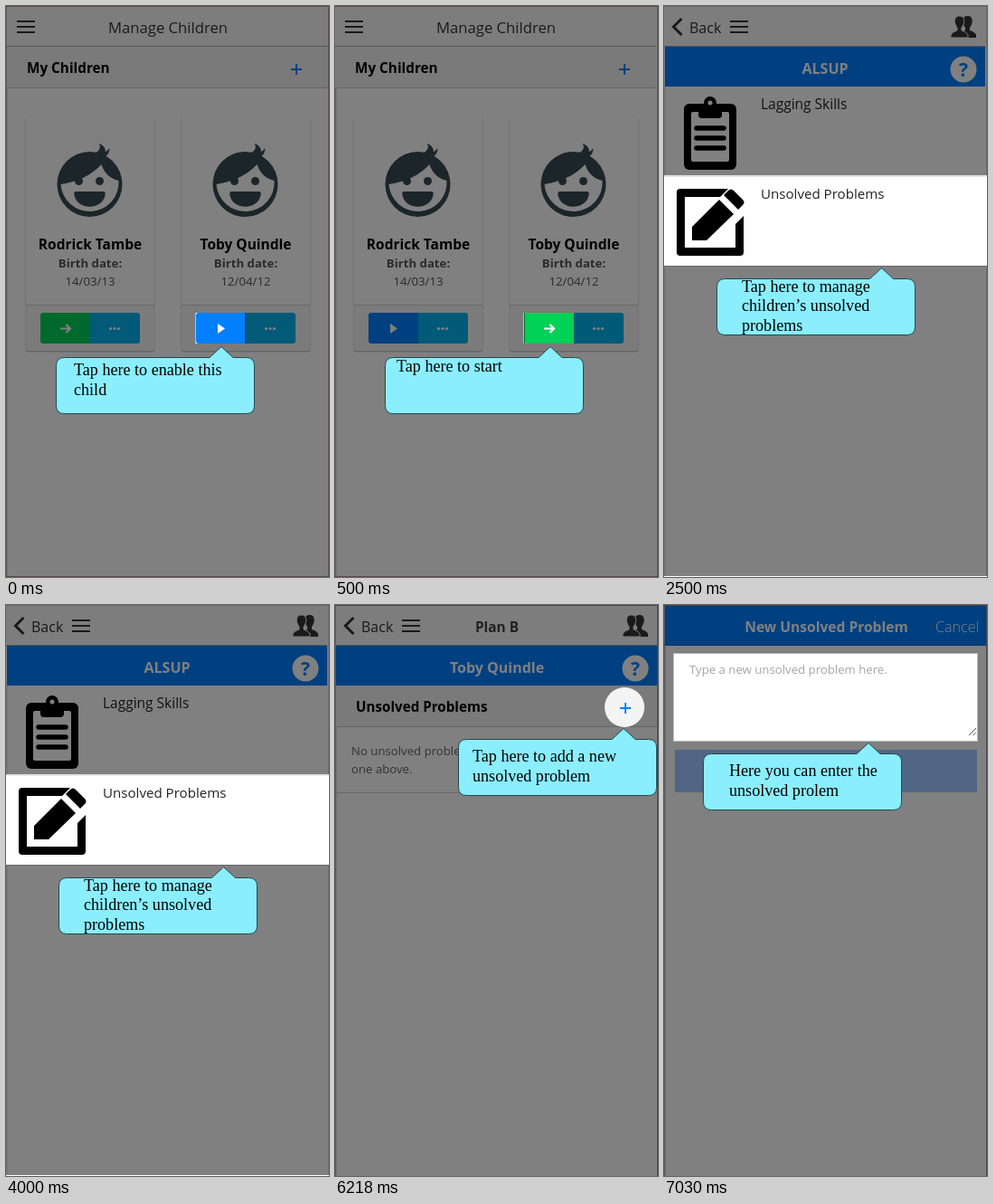
An HTML page that plays this animation: 357 by 631 pixels, repeating every 8000 ms.

```html
<!DOCTYPE html>
<html lang="en">
<head>
<meta charset="utf-8">
<title>App walkthrough</title>
<style>
  html, body { margin: 0; width: 100%; height: 100%; overflow: hidden; background: #808080; }
  svg { display: block; width: 357px; height: 631px; font-family: "Open Sans", "Noto Sans", sans-serif; }
  .note { font: 18.1px "Liberation Serif", "Times New Roman", serif; }
</style>
</head>
<body>
<svg id="stage" viewBox="0 0 357 631"></svg>
<script>
const INK = '#1a1a1a', BLUE = '#004080', CYAN = '#005a78', GREEN = '#00692c', PALE = '#808080', HAIR = '#1b252a';

const rect = (x, y, w, h, fill, extra = '') =>
  `<rect x="${x}" y="${y}" width="${w}" height="${h}" fill="${fill}" ${extra}/>`;
const path = (d, fill, extra = '') => `<path d="${d}" fill="${fill}" ${extra}/>`;
const line = (d, color, width, extra = '') =>
  path(d, 'none', `stroke="${color}" stroke-width="${width}" ${extra}`);
const circle = (x, y, r, fill) => `<circle cx="${x}" cy="${y}" r="${r}" fill="${fill}"/>`;
const text = (x, y, size, fill, str, weight = 400, anchor = 'start') =>
  `<text x="${x}" y="${y}" font-size="${size}" font-weight="${weight}" fill="${fill}" text-anchor="${anchor}">${str}</text>`;
const centered = (x, y, size, fill, str, weight = 700) => text(x, y, size, fill, str, weight, 'middle');
const at = (x, y, body) => `<g transform="translate(${x} ${y})">${body}</g>`;

const page = (edge) => rect(0, 0, 357, 631, PALE) + line('M.8 0V631M356.5 0V631M0 .5H357', edge, 1);
const bottomEdge = (color) => rect(0, 630, 357, 1, color);
const bar = (y, h, fill, edge = '#646464') => rect(1, y, 355, h, fill) + rect(1, y + h, 355, 1, edge);
const menu = (x) => line(`M${x} 17h20m-20 6h20m-20 6h20`, INK, 2);
const plus = (x, y, color) => line(`M${x - 6} ${y}h12m-6-6v12`, color, 2);

function bubble(x, y, tip, textX, textY, leading, lines) {
  const shape = `M${x + 9} ${y}H${x + tip - 13}l13-12 13 12H${x + 210}q9 0 9 9v44q0 9-9 9H${x + 9}q-9 0-9-9v-44q0-9 9-9z`;
  return path(shape, '#8aeefd', 'stroke="#24474e"') + lines.map((str, i) =>
    `<text class="note" x="${textX}" y="${textY + i * leading}">${str}</text>`).join('');
}

// Face centred on 0,0
const face =
  circle(0, 0, 36, HAIR) +
  path('M-32 0C-13-3 2-10 13-22C16-12 23-6 32-4A32 32 0 1 1-32 0z', PALE) +
  path('M4-33C11-37 13-41 10-45C16-43 18-39 17-36Q20-37 22-40Q22-34 17-30z', HAIR) +
  circle(-12, -3.5, 4.5, HAIR) + circle(11, -3.5, 4.5, HAIR) +
  path('M-15 8H15Q18 8 17 12C14 29-14 29-17 12Q-18 8-15 8z', HAIR);

const arrowIcon = (x, color) => line(`M${x - 6} 356.5h11m-4.5-4.5 4.5 4.5-4.5 4.5`, color, 2.2);
const playIcon = (x, color) => path(`M${x - 4} 351l8 5.5-8 5.5z`, color);

// The spotlight cutout is one pixel narrower than the button it reveals.
function button(x, started, lit) {
  const dim = started ? GREEN : BLUE;
  const fill = lit ? (started ? '#00d157' : '#0080ff') : dim;
  const icon = started ? arrowIcon : playIcon;
  return (lit ? rect(x - .5, 339, 4, 34, '#fff') : '') +
    path(`M${x + 55} 339v34h-52q-3 0-3-3v-28q0-3 3-3z`, fill) +
    (lit ? rect(started ? x : x + 54, 339, 1, 34, dim) : '') +
    icon(x + 28, lit ? '#fff' : PALE);
}

function card(x, name, date, started, lit) {
  const mid = x + 71, left = x + 16;
  return rect(x - .5, 123.5, 143, 259, '#666', 'rx="2"') +
    rect(x, 123, 142, 258, PALE, 'rx="2"') +
    rect(x, 330, 142, 51, '#7b7b7b') + rect(x, 330, 142, 1, '#686868') +
    at(mid - .5, 197, face) +
    centered(mid, 269, 15.5, '#000', name) +
    centered(mid, 289, 13.2, '#2a2a2a', 'Birth date:') +
    centered(mid, 309, 13.2, '#2a2a2a', date, 400) +
    path(`M${left + 55} 339h52q3 0 3 3v28q0 3-3 3h-52z`, CYAN) +
    button(left, started, lit) +
    [-4.5, 0, 4.5].map(d => circle(left + 82 + d, 356.5, 1.6, PALE)).join('');
}

const childList = (shift, secondStarted) => page('#5c4a44') + bottomEdge('#5c4a44') + at(shift, 0,
  bar(1, 43, '#7d7d7d', '#555') + bar(45, 45, '#7a7a7a') + menu(12) +
  centered(179, 30, 16.7, INK, 'Manage Children', 400) +
  text(23, 74, 15.3, '#000', 'My Children', 700) + plus(321, 70, BLUE) +
  card(22, 'Rodrick Tambe', '14/03/13', !secondStarted, false) +
  card(194, 'Toby Quindle', '12/04/12', secondStarted, true));

const person = 'M0 35V32Q1 29 7 27V24C3 19 3 11 9.5 11S16 19 12 24V27Q18 29 19 32V35z';
const backHeader =
  bar(1, 43, '#7d7d7d', '#555') + menu(74) +
  line('M20.5 14l-9 9 9 9', INK, 3) + text(29, 29.5, 16, INK, 'Back') +
  at(327, 0, path(person, INK)) +
  at(318, 0, path(person, INK, 'stroke="#7d7d7d"'));
const blueBar = (title) =>
  rect(1, 45, 355, 44, BLUE) + centered(179, 75, 16, PALE, title) +
  circle(332, 70, 14.5, PALE) + centered(332, 77.5, 21, BLUE, '?');

const clipboard =
  rect(22, 108, 58, 73, '#000', 'rx="6"') + rect(30, 117, 42, 55, PALE, 'rx="2"') +
  circle(51, 107, 7, '#000') + rect(38, 109, 26, 15, '#000', 'rx="4"') + circle(51, 107, 2.5, PALE) +
  line('M36 135H66M36 146H66M36 157H66', '#000', 5.5, 'stroke-linecap="round"');
const compose =
  path('M71 202H18q-4 0-4 4v66q0 4 4 4h66q4 0 4-4V232l-9 9v26H23V211H62z', '#000') +
  path('M31 259V244L61 214L77 230L47 259z', '#000') +
  path('M66 209L71 204Q74 201 77 204L87 214Q90 217 87 220L82 225z', '#000');

const skills = page('#6a6a6a') + bottomEdge('#fff') +
  at(-1, 0, backHeader + blueBar('ALSUP')) + rect(0, 45, 1, 44, PALE) +
  clipboard + text(107, 114, 15.5, '#111', 'Lagging Skills') +
  rect(0, 187, 357, 100, '#fff') + rect(0, 187, 357, 2, '#e4e4e4') + rect(0, 287, 357, 1, '#686868') +
  compose + text(107, 213, 15.1, '#222', 'Unsolved Problems');

const plan = page('#464646') + backHeader +
  centered(179, 30, 15.4, '#222', 'Plan B') + blueBar('Toby Quindle') +
  bar(89, 45, '#7a7a7a') + text(23, 118, 15.2, '#000', 'Unsolved Problems', 700) +
  text(18, 166, 13.2, '#333', 'No unsolved problems. Add') +
  text(18, 186, 13.2, '#333', 'one above.') +
  rect(1, 207, 355, 1, '#686868') +
  circle(320, 113, 22, '#f4f4f4') + plus(321, 114, '#0080ff');

const entry = page('#464646') +
  bar(1, 43, BLUE, '#00356c') +
  centered(179.5, 30, 15.6, PALE, 'New Unsolved Problem') +
  text(300, 30, 16.1, PALE, 'Cancel', 300) +
  rect(10.5, 53.5, 336, 97, '#fff', 'stroke="#b4b4b4"') +
  text(28, 76, 13.2, '#a6a6a6', 'Type a new unsolved problem here.') +
  line('M337 144l8-8M341.5 144l3.5-3.5', '#555', 1) +
  rect(12, 160, 334, 47, '#506684');

const scenes = [
  [0, childList(0, false) + bubble(55.5, 388.5, 182.5, 75, 408, 22, ['Tap here to enable this', 'child'])],
  [500, childList(-1, true) + bubble(55.5, 388.5, 182.5, 68, 404, 22, ['Tap here to start'])],
  [2500, skills + bubble(58.5, 301.5, 182, 86, 316, 21.3, ['Tap here to manage', 'children’s unsolved', 'problems'])],
  [5000, plan + bubble(136.5, 148.5, 182.5, 152, 173, 22, ['Tap here to add a new', 'unsolved problem'])],
  [7030, entry + bubble(43.5, 164.5, 182.5, 72, 189, 22, ['Here you can enter the', 'unsolved prolem'])]
];

const stage = document.getElementById('stage');
const start = performance.now();
let shown;
function draw() {
  const time = (performance.now() - start) % 8000;
  const scene = scenes.findLast(([from]) => time >= from);
  if (scene !== shown) stage.innerHTML = scene[1];
  shown = scene;
  requestAnimationFrame(draw);
}
draw();
</script>
</body>
</html>
```
